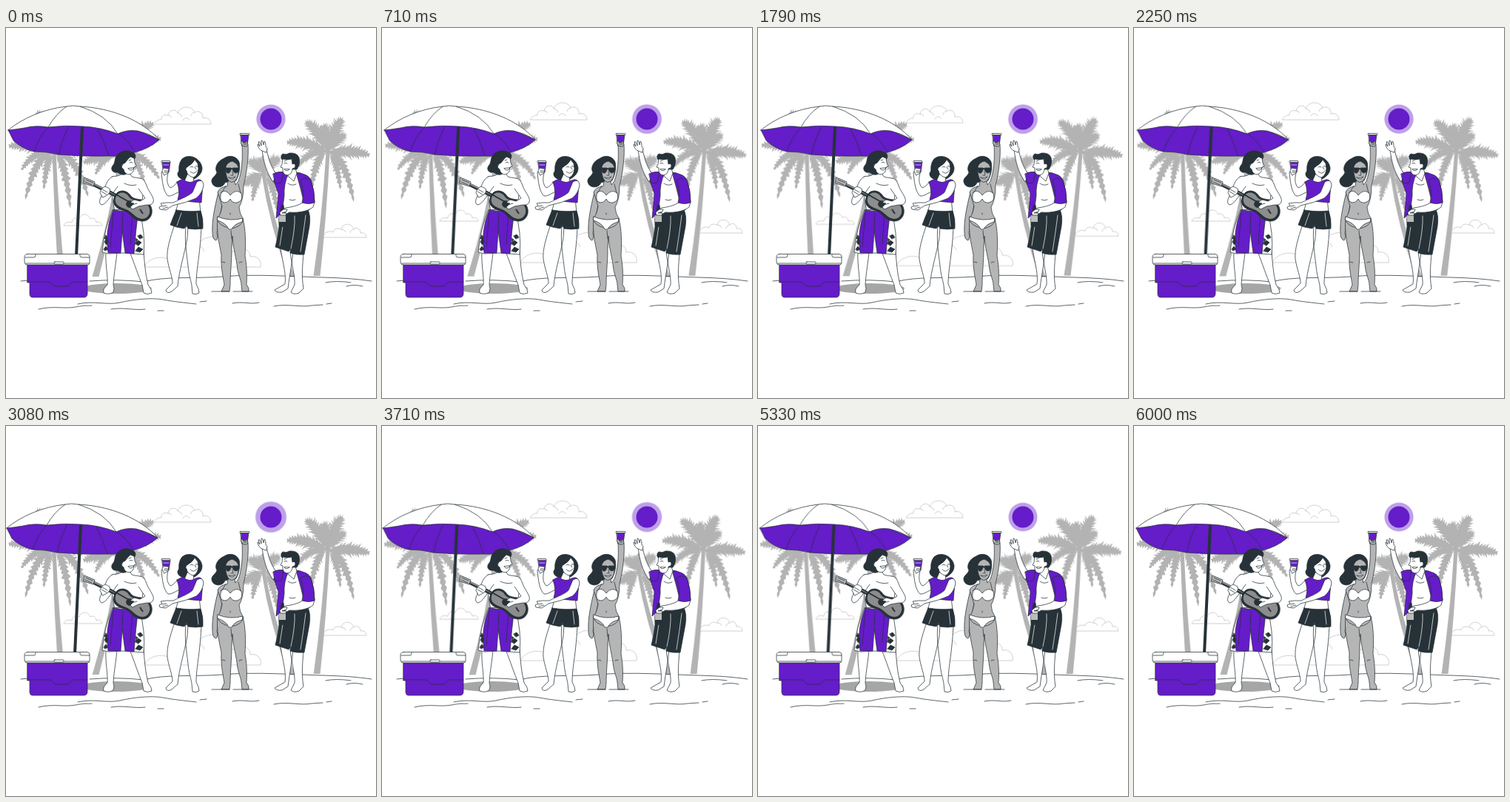
An HTML page that plays this animation: 500 by 500 pixels, repeating every 6.04 s.

```html
<!DOCTYPE html>
<html lang="en">
<head>
<meta charset="utf-8">
<title>Beach party</title>
<style>
  html, body { margin: 0; width: 100%; height: 100%; overflow: hidden; background: #fff; }
  svg { display: block; width: 100vw; height: 100vh; }
  .o, .p, .d, .s, .l { stroke: #263238; stroke-width: .75; stroke-linecap: round; stroke-linejoin: round; }
  .o { fill: #fff; }
  .p { fill: #651cc9; }
  .d { fill: #263238; }
  .s { fill: #b5b5b5; }
  .l { fill: none; }
  .w { fill: none; stroke: #fff; stroke-width: .7; stroke-linecap: round; }
  .cloud { fill: #fff; stroke: #c4c4c4; stroke-width: .8; stroke-linejoin: round; }
  .palm { fill: #b3b3b3; }
  .palm, .halo { transform-box: fill-box; transform-origin: center; }
  .palm { animation: wind 6.04s linear infinite; }
  .halo { fill: #bda0e8; animation: pulse 6.04s linear infinite; }
  .clouds { animation: float 1.51s ease-in-out infinite; }
  .parasol { animation: drift 6.04s linear infinite; }
  @keyframes wind { 25% { transform: rotate(1.3deg); } 75% { transform: rotate(-1.3deg); } }
  @keyframes float { 50% { transform: translateY(-6px); } }
  @keyframes pulse {
    0%, 37%, 100% { transform: scale(1); }
    22% { transform: scale(1.03); }
    51% { transform: scale(1.07); }
    73% { transform: scale(.985); }
  }
  @keyframes drift {
    0%, 100% { transform: none; }
    22% { transform: translateX(.4px); }
    37% { transform: translateX(1.6px); }
    51% { transform: translateX(-2px); }
    73% { transform: translateX(-1.4px); }
    88% { transform: translateX(-.5px); }
  }
</style>
</head>
<body>
<svg viewBox="0 0 500 500">
  <!-- sky -->
  <circle class="halo" cx="358" cy="123" r="19.6"/>
  <circle cx="358" cy="123" r="14.5" fill="#651cc9"/>
  <g class="clouds">
    <path class="cloud" d="M200 130H277C277 124 272 120 266 122C267 114 260 111 255 114C252 105 236 104 232 115C230 109 220 110 219 118C213 116 209 120 210 124C206 123 202 126 200 130Z"/>
    <path class="cloud" d="M239 125C241 120 247 121 248 125M255 114Q250 115 250 119M219 118Q223 118 224 121M232 115Q237 116 238 120" fill="none"/>
    <path class="cloud" d="M78 267H130C130 263 126 261 122 263C122 257 116 256 114 258C111 250 101 250 99 258C94 255 89 258 89 263C84 261 79 263 78 267Z"/>
    <path class="cloud" d="M428 283H487C487 278 483 276 479 277C479 270 473 269 470 272C467 263 455 263 453 272C448 270 443 271 442 276C436 273 429 277 428 283Z"/>
    <path class="cloud" d="M453 272Q458 272 459 276M470 272Q465 273 465 277" fill="none"/>
    <path class="cloud" d="M187 323H344C346 314 339 307 330 309C330 298 317 295 310 301C306 278 266 276 258 294C250 288 241 293 240 304C229 301 221 305 219 312C206 307 191 313 187 323Z"/>
    <path class="cloud" d="M258 294Q266 295 268 302M310 301Q302 302 300 309M219 312Q226 312 229 316" fill="none"/>
  </g>
  <g id="palms"></g>

  <!-- sand -->
  <path class="l" d="M20 342L30 341M113 342Q150 339 186 343M186 343C215 335 255 339 292 336C335 332 390 336 428 337Q468 338 494 342M432 344Q446 341 466 344M460 349Q470 346 482 349M97 373C118 368 137 375 154 371S196 364 212 367S240 371 257 373M44 380C64 375 78 380 94 377S108 376 116 375M142 380C158 377 174 382 188 380M205 382H213M306 372C320 369 331 374 342 371M362 376C380 372 398 378 413 375L428 374M433 373L440 372M262 370L271 369"/>

  <g class="parasol">
    <ellipse cx="150" cy="352" rx="47" ry="7" fill="#a6a6a6"/>
    <path class="p" d="M3 138L10 152Q21 163 38 167Q55 167 71 171Q104 174 139 173Q157 174 174 168Q194 163 207 151L150 126L57 122Z"/>
    <path class="l" d="M57 134Q44 148 38 167M84 134Q75 152 71 171M124 136Q133 153 139 173M151 142Q165 151 174 168"/>
    <path d="M103 134L95 308" stroke="#263238" stroke-width="4"/>
    <path class="o" d="M3 138C22 122 52 109 82 106Q90 104 100 106C143 108 184 125 207 151Q192 142 178 139Q163 137 151 143Q128 134 104 133Q80 131 57 134Q40 131 25 135Q13 137 3 138Z"/>
    <path class="l" d="M82 106Q67 116 57 134M100 106Q136 117 151 143"/>
  </g>

  <!-- cooler -->
  <path class="p" d="M29 318H110V359Q110 364 105 364H36Q32 364 32 359V344H29Z"/>
  <path class="l" d="M30 343H58Q61 343 63 346T68 349H81Q85 349 87 346T92 343H110"/>
  <path class="o" d="M29 305.500H110Q113 306 113 309V317Q113 320 110 320H29Q25 320 25 316V309Q25 306 29 305.500Z"/>
  <path class="l" d="M26 310H37Q40 310 40 308V306M100 306V308Q100 310 103 310H113M27 318H112"/>
  <rect class="o" x="65" y="316" width="13" height="3" rx="1"/>

  <!-- guitarist -->
  <g>
    <path class="o" d="M135 302C134 322 138 335 137 347Q130 353 132 358Q139 361 145 357Q147 352 145 347C146 330 149 316 150 303ZM167 302C174 320 179 335 184 347L186 358Q191 361 197 358Q197 353 192 347C188 331 187 316 186 301Z"/>
    <path class="o" d="M143 201C152 200 157 199 158 194L168 195Q167 201 174 202Q185 202 187 210L182 248H147L143 226Z"/>
    <path class="o" d="M144 246Q133 270 130 303L138 305L158 304L186 306Q189 279 180 245Z"/>
    <path class="p" d="M145 246Q163 249 179 245Q175 276 173 305L161 304L157 275L155 304L138 304Q133 274 145 246Z"/>
    <path class="l" d="M158 250L157 276M145 249L141 296M171 249L168 292"/>
    <path class="d" d="M133 289l3-5 2 5-2 4zm-1 10 3-4 3 4-4 2zM135 280l2 3-2 3-2-2zM174 291l5-4 4 3-4 4zM175 301l4-5 6 3-4 4zM178 281l4-2 3 4-4 2zM175 284l3 2-2 3z"/>
    <path class="o" d="M146 200C135 203 134 217 129 227Q124 236 129 239Q133 239 139 231L151 214"/>
    <path d="M107 206L165 235" stroke="#263238" stroke-width="4.500"/>
    <path d="M109 206L162 232" stroke="#888" stroke-width="2.500"/>
    <path class="s" d="M106 202L120 208L118 214L105 210Z"/>
    <path class="l" d="M108 205L117 209M107 208L116 212"/>
    <path class="d" d="M146 230C149 217 163 218 168 226C173 234 185 229 193 237C202 247 196 262 183 261C171 260 169 250 160 247C151 245 143 240 146 230Z"/>
    <path fill="#8d8d8d" d="M148 230C151 220 162 221 166 228C172 236 183 232 191 239C198 247 193 258 184 258C174 257 171 248 162 245C153 242 146 238 148 230Z"/>
    <circle class="d" cx="167" cy="238" r="4.500"/>
    <path d="M140 220L168 236M181 245L185 251" stroke="#263238" stroke-width="2"/>
    <path class="o" d="M127 222Q129 216 134 214L140 217Q142 221 138 225L131 229Z"/>
    <path class="l" d="M130 218L137 222M129 221L136 225"/>
    <path class="o" d="M181 203Q187 203 190 213C193 222 201 229 199 235Q197 240 190 239L179 241L171 245L168 242L173 237L168 236L173 232L181 234L188 230L179 217"/>
    <path class="l" d="M160 210Q168 214 176 212M170 239L177 237"/>
    <path class="d" d="M150 172C156 164 167 165 170 168C176 169 176 175 173 178L164 196C160 200 154 198 151 195C144 197 140 190 145 185C148 181 146 177 150 172Z"/>
    <path class="o" d="M161 182Q165 177 168 174L173 176L174 182L176 187L173 188Q173 197 166 198Q160 197 159 191Q155 189 157 185Q159 183 161 182Z"/>
    <path class="l" d="M165 190Q169 195 173 189ZM167 182Q169 180 171 182M166 179L169 178"/>
  </g>

  <!-- dancer with cup -->
  <g>
    <path class="o" d="M227 268C222 284 217 298 218 312C220 326 225 336 225 345L216 354Q217 360 224 356L232 349C234 327 241 306 245 284L246 269ZM243 268C241 287 244 305 246 321C247 334 250 341 251 348L252 359Q257 361 261 358Q261 353 257 346C257 325 263 303 264 267Z"/>
    <path class="o" d="M234 232L229 249H263L261 231Z"/>
    <path class="d" d="M230 246Q248 249 263 247Q267 258 266 271Q256 273 246 271L244 266L241 271Q231 270 222 266Q226 255 230 246Z"/>
    <path class="w" d="M237 250L231 267M258 250L260 268"/>
    <path class="d" d="M238 177C244 171 255 173 260 179C266 185 267 193 261 199C256 204 252 206 246 205C238 206 231 202 232 196C235 192 233 190 234 186Q235 180 238 177Z"/>
    <path class="o" d="M245 198L241 207L254 210L253 198Z"/>
    <path class="o" d="M232 208Q226 215 222 216C217 211 217 204 219 196L214 192L210 195C211 208 213 222 219 227Q223 228 234 221Z"/>
    <path class="p" d="M231 208Q235 205 240 204Q246 212 256 206Q265 202 266 211L264 236Q247 235 232 232Q236 221 231 208Z"/>
    <path class="o" d="M258 208Q266 203 267 212C266 220 262 226 257 230Q244 236 225 240L216 246L208 245L207 242L211 240L209 237L217 236L226 236C238 230 247 227 252 222Z"/>
    <path class="l" d="M211 241L217 240M212 244L219 242"/>
    <path class="o" d="M246 187Q252 184 255 178L259 183L260 190Q259 200 253 202Q245 200 244 193Q241 190 246 187Z"/>
    <path class="l" d="M249 188Q251 186 253 188M256 187Q257 186 259 187M249 194Q254 199 258 193M255 188L257 191"/>
    <path class="p" d="M211 181H222L220 195H213Z"/>
    <rect class="o" x="210" y="179.500" width="12" height="2" rx="1"/>
    <path class="w" d="M213 185H220"/>
    <path class="o" d="M211 193L213 189L217 190L220 190L219 196L214 199Z"/>
    <path class="l" d="M214 193H219M214 195H219"/>
  </g>

  <!-- dancer in sunglasses -->
  <g>
    <path class="d" d="M295 176C301 171 312 173 315 181C317 189 315 198 311 206C304 210 299 207 296 209C293 217 280 217 278 208C277 202 284 200 285 195C281 189 286 179 295 176Z"/>
    <path class="s" d="M287 222C282 242 278 261 279 277Q279 286 284 287Q287 284 285 277L292 239Z"/>
    <path class="s" d="M286 258C284 274 288 291 291 306C290 325 294 339 295 347L291 356H302L303 347C303 331 305 316 305 297L306 281C307 297 310 306 312 319C313 333 318 340 318 347L319 356H328Q329 351 325 347C326 330 325 319 323 308C324 291 324 272 320 258Z"/>
    <path class="s" d="M300 207L299 214Q288 215 286 222Q290 233 292 241Q291 250 286 258Q286 267 304 271Q318 269 321 259Q315 250 315 242Q321 232 321 213C326 193 328 172 327 158L319 157C320 177 319 193 314 207L310 212L309 207Z"/>
    <path class="o" d="M291 222Q297 217 303 226Q310 217 318 223Q321 234 312 236Q306 237 303 231Q299 238 292 235Q288 231 291 222Z"/>
    <path class="l" d="M292 222L297 213M317 223L314 211"/>
    <path class="o" d="M286 255Q303 262 320 257L319 262Q308 265 305 272H301Q298 264 286 260Z"/>
    <path class="s" d="M297 187Q300 181 306 180Q313 183 314 188Q315 201 310 206Q304 211 300 205Q296 198 297 187Z"/>
    <path class="d" d="M297 189H304L305 190L307 189H315Q315 196 310 196Q307 195 306 191H304Q303 197 299 196Q297 195 297 189Z"/>
    <path class="o" d="M301 202Q305 204 310 201Q306 207 301 202Z"/>
    <path class="l" d="M306 194L307 199L304 199M303 250V252M304 274L305 285M292 316L296 317M315 317L319 316M278 356H302M307 356H333"/>
    <path class="p" d="M317 144H328L326 159H319Z"/>
    <rect class="o" x="316" y="142.500" width="13" height="2" rx="1"/>
    <path class="s" d="M318 152L321 155L326 153L327 158L325 160L321 160L318 157Z"/>
    <path class="l" d="M321 155L325 155M321 157H325"/>
  </g>

  <!-- waving man -->
  <g>
    <path class="o" d="M371 298C374 318 379 332 377 346L363 354Q365 358 373 357L381 352C383 334 387 318 388 301ZM384 302C386 321 391 336 390 347L385 357Q389 361 396 358L402 352C399 334 401 319 402 304Z"/>
    <path class="o" d="M374 197L384 195L398 196L408 208L409 247L373 251Z"/>
    <path class="d" d="M375 248Q391 252 408 246Q412 253 410 268L403 306Q392 307 384 304L385 298L382 302L364 296Q370 271 370 253Z"/>
    <path class="w" d="M390 254Q391 270 385 298M405 253Q402 277 398 302M374 268L370 294"/>
    <path class="p" d="M364 196Q373 193 382 196Q375 211 376 227L373 250L365 257Q367 236 368 224L362 207Z"/>
    <path class="o" d="M365 197C357 186 354 174 352 163L346 164C348 180 351 194 361 208Z"/>
    <path class="o" d="M346 166Q341 164 340 157Q341 156 343 160L341 154Q343 152 345 159L345 152Q347 151 348 158L349 153Q351 153 351 160L353 163L352 168Z"/>
    <path class="p" d="M361 197Q368 193 375 196L372 209L364 210Z"/>
    <path class="p" d="M392 195Q408 197 412 205Q417 220 417 235L411 239L410 246Q406 241 403 237Q398 216 392 195Z"/>
    <path class="o" d="M402 235C396 240 386 242 378 243L374 245L372 250L376 253L383 249C394 250 408 248 415 242L417 235Z"/>
    <path class="p" d="M398 206Q405 199 412 206Q417 220 417 236Q409 239 400 236Q404 221 398 206Z"/>
    <path class="l" d="M381 210Q386 214 392 211M383 232Q387 234 391 232"/>
    <path class="d" d="M372 240Q372 239 375 239L376 247Q379 251 378 267Q374 270 369 267Q368 252 371 247Z"/>
    <path fill="#bbb" d="M369 253H378V262H369Z"/>
    <path class="o" d="M370 249L375 245L380 245L379 248L373 250L379 250L378 253L371 253Z"/>
    <path class="o" d="M380 192L381 200L389 207L393 196L391 190Z"/>
    <path class="d" d="M373 178Q370 173 374 170Q379 172 383 169Q393 168 396 175Q398 184 393 191L387 191L380 178Z"/>
    <path class="o" d="M374 177Q380 179 386 177L387 184Q391 182 391 187Q390 190 387 190Q387 198 380 199Q373 198 374 189L371 188L373 184Z"/>
    <path class="l" d="M376 183Q378 181 380 183M376 191Q378 195 383 191ZM376 180L379 179"/>
  </g>
</svg>
<script>
  const fix = n => n.toFixed(1);

  // A feathered leaf along a curved spine; leaflets sweep toward the tip.
  function frond(x, y, dx, dy) {
    const up = dy < 15, w = up ? 12 : 8, n = 14;
    const cx = x + dx * .6, cy = y + (up ? dy * .8 : dy * .1) - 7;
    const at = (t, off, ahead) => {
      const u = 1 - t;
      const px = u * u * x + 2 * u * t * cx + t * t * (x + dx);
      const py = u * u * y + 2 * u * t * cy + t * t * (y + dy);
      const tx = u * (cx - x) + t * (x + dx - cx), ty = u * (cy - y) + t * (y + dy - cy);
      const len = Math.hypot(tx, ty) || 1;
      return fix(px + (tx * ahead - ty * off) / len) + ' ' + fix(py + (ty * ahead + tx * off) / len);
    };
    const pts = [];
    for (const side of [1, -1]) {
      const edge = [];
      for (let i = 0; i < n; i++) {
        const t = i / n, env = .2 + .8 * Math.sin(Math.PI * t ** .8);
        edge.push(at(t, side * w * .42 * env, 0));
        edge.push(at(t, side * w * env * (.85 + .15 * Math.sin(i * 2.3)), 8 * (1 - t * .6)));
      }
      pts.push(...(side > 0 ? [...edge, at(1, 0, 0)] : edge.reverse()));
    }
    return 'M' + pts.join('L') + 'Z';
  }

  function palm(x, y, bx, by, tips) {
    const mx = x + (bx - x) * .3, my = (y + by) / 2;
    const trunk = `M${x - 2.5} ${y}Q${mx - 3} ${my} ${bx - 4.5} ${by}H${bx + 4.5}Q${mx + 3} ${my} ${x + 2.5} ${y}Z`;
    const leaves = tips.map(([dx, dy]) => `<path d="${frond(x, y, dx, dy)}"/>`).join('');
    return `<g class="palm"><path d="${trunk}"/>${leaves}</g>`;
  }

  document.getElementById('palms').innerHTML =
    palm(65, 168, 75, 335, [[-61, -8], [-23, -54], [30, -48], [50, 2], [-39, 64], [-14, 50], [22, 76], [46, 60], [-44, 24]]) +
    palm(155, 170, 121, 336, [[44, -40], [54, -20], [52, 34], [32, 39], [-34, 28], [-50, 12], [-15, -40]]) +
    palm(348, 198, 386, 336, [[-20, -16], [-2, -22], [22, -20], [-26, 14], [-15, 36], [18, 48], [30, 20]]) +
    palm(435, 168, 420, 335, [[-55, -13], [-30, -40], [-6, -36], [20, -44], [56, 4], [35, 67], [17, 50], [-24, 54], [-43, 22], [24, -22]]);
</script>
</body>
</html>
```
